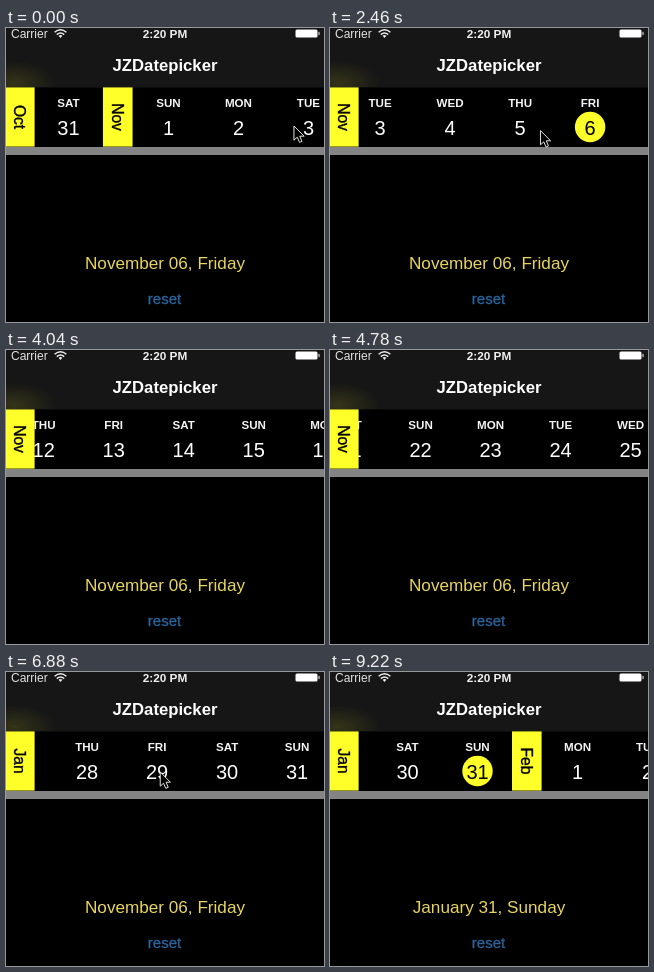
Animation, 318 px wide and 294 px high, one loop 9.24 s. Source, as an HTML page:

```html
<!DOCTYPE html>
<html lang="en">
<head>
<meta charset="utf-8">
<title>JZDatepicker</title>
<style>
  html, body { margin: 0; width: 100%; height: 100%; overflow: hidden; background: #000; }
  svg { display: block; width: 100%; height: 100%; }
  text { font-family: "Liberation Sans", Arial, sans-serif; text-anchor: middle; fill: #fff; }
  .bold { font-weight: bold; }
  .weekday { font-size: 11.6px; font-weight: bold; fill: #f4f4f4; }
  .day { font-size: 20px; }
  .month { font-size: 15.6px; fill: #000; stroke: #000; stroke-width: .35; }
  .picked .day { fill: #000; }
  .dot { fill: #ffff2a; visibility: hidden; }
  .picked .dot { visibility: visible; }
</style>
</head>
<body>
<svg viewBox="0 0 318 294">
  <defs>
    <radialGradient id="glow">
      <stop offset="0" stop-color="#ffff2a" stop-opacity=".13"/>
      <stop offset="1" stop-color="#ffff2a" stop-opacity="0"/>
    </radialGradient>
    <clipPath id="navClip"><rect width="318" height="59"/></clipPath>
    <clipPath id="stripClip"><rect y="59" width="318" height="60"/></clipPath>
  </defs>
  <rect width="318" height="294"/>

  <rect width="318" height="59.5" fill="#161616"/>
  <ellipse cx="8" cy="55" rx="42" ry="22" fill="url(#glow)" clip-path="url(#navClip)"/>
  <text x="5" y="9.6" font-size="12" style="text-anchor:start;fill:#e2e2e2">Carrier</text>
  <g fill="none" stroke="#eee" stroke-width="1.5">
    <path d="M48.6 4.3Q54.5-.9 60.4 4.3M50.8 6.6Q54.5 3.4 58.2 6.6"/>
    <path d="M52.6 7.8Q54.5 6.4 56.4 7.8L54.5 10Z" fill="#eee" stroke="none"/>
  </g>
  <text class="bold" x="159" y="9.6" font-size="11.8" style="fill:#f0f0f0">2:20 PM</text>
  <rect x="289.5" y="1.4" width="22" height="8.2" rx="1.5" fill="#fff"/>
  <rect x="312.3" y="3.8" width="1.5" height="3.4" rx=".7" fill="#aaa"/>
  <text class="bold" x="159" y="43" font-size="16.7">JZDatepicker</text>

  <g clip-path="url(#stripClip)">
    <g id="days"></g>
    <g id="months"></g>
  </g>
  <rect y="119" width="318" height="8" fill="#848484"/>

  <text id="label" x="159" y="241" font-size="17.15" style="fill:#e8d560"></text>
  <text x="158.5" y="276" font-size="15" style="fill:#2b659f;stroke:#2b659f;stroke-width:.3">reset</text>
  <path id="cursor" d="M0 0V14.2L3.3 11.2L5.6 16.4L8 15.3L5.8 10.2H10.2Z"
        fill="#000" stroke="#e4e4dc" stroke-linejoin="round"/>
</svg>
<script>
const LOOP = 9240, TAP = 7960, CELL = 70, HEAD = 30;
const $ = id => document.getElementById(id);

// time, scroll offset (0 puts the November header at the left edge)
const scrollPath = [
  [0, -97], [1580, -31], [2100, 50], [2600, 200], [3260, 403], [3800, 640],
  [4780, 1444], [5740, 2530], [6300, 4400], [6880, 6204], [7500, 6348]
];
// time, x, y for each stretch in which the pointer is on stage
const pointerPaths = [
  [[0, 288, 98], [1580, 207.5, 104], [2100, 118, 104], [2600, 232, 102],
   [3260, 152.5, 100], [3740, -14, 104]],
  [[5860, 320, 108], [6150, 130, 106], [6450, 262, 104], [6880, 154.5, 100],
   [7300, 24, 102], [7820, 146, 100], [8120, 146, 100], [8420, -14, 104]]
];

// Monotone cubic interpolation through column k of the points
function sample(pts, t, k = 1) {
  const last = pts.length - 1;
  if (t <= pts[0][0]) return pts[0][k];
  if (t >= pts[last][0]) return pts[last][k];
  const slope = i => (pts[i + 1][k] - pts[i][k]) / (pts[i + 1][0] - pts[i][0]);
  const tangent = i => {
    if (i === 0) return slope(0);
    if (i === last) return 0;
    const a = slope(i - 1), b = slope(i);
    return a * b > 0 ? 2 * a * b / (a + b) : 0;
  };
  let i = 0;
  while (t > pts[i + 1][0]) i++;
  const h = pts[i + 1][0] - pts[i][0], u = (t - pts[i][0]) / h, v = 1 - u;
  return v * v * (1 + 2 * u) * pts[i][k] + u * u * (3 - 2 * u) * pts[i + 1][k]
    + h * u * v * (v * tangent(i) - u * tangent(i + 1));
}

function add(parent, tag, attrs, text = '') {
  const el = document.createElementNS('http://www.w3.org/2000/svg', tag);
  for (const name in attrs) el.setAttribute(name, attrs[name]);
  el.textContent = text;
  return parent.appendChild(el);
}

const weekdays = ['SUN', 'MON', 'TUE', 'WED', 'THU', 'FRI', 'SAT'];
const sections = [], cells = {};
let left = -(HEAD + 31 * CELL);

['Oct', 'Nov', 'Dec', 'Jan', 'Feb'].forEach((name, n) => {
  const month = 9 + n;
  const count = new Date(Date.UTC(2015, month + 1, 0)).getUTCDate();
  for (let d = 1; d <= count; d++) {
    const date = new Date(Date.UTC(2015, month, d));
    const x = left + HEAD + CELL * (d - .5) + .5;
    const cell = add($('days'), 'g', { transform: `translate(${x} 0)` });
    add(cell, 'circle', { class: 'dot', cy: 99, r: 15.2 });
    add(cell, 'text', { class: 'weekday', y: 78.6 }, weekdays[date.getUTCDay()]);
    add(cell, 'text', { class: 'day', y: 106.7 }, d);
    cells[name + d] = cell;
  }
  const header = add($('months'), 'g', {});
  add(header, 'rect', { y: 59.4, width: HEAD - .4, height: 59.2, fill: '#ffff2a' });
  add(header, 'text', { class: 'month', transform: 'translate(8.6 89) rotate(90)' }, name);
  sections.push({ left, header });
  left += HEAD + count * CELL;
});

function draw(now) {
  const t = now % LOOP;
  const offset = sample(scrollPath, t);
  $('days').setAttribute('transform', `translate(${-offset} 0)`);

  // Headers stick to the left edge until the next one pushes them out
  sections.forEach(({ left, header }, i) => {
    const next = i + 1 < sections.length ? sections[i + 1].left : Infinity;
    const x = Math.min(Math.max(left - offset, -1), next - offset - HEAD);
    header.setAttribute('transform', `translate(${x} 0)`);
  });

  const tapped = t >= TAP;
  cells.Nov6.classList.toggle('picked', !tapped);
  cells.Jan31.classList.toggle('picked', tapped);
  $('label').textContent = tapped ? 'January 31, Sunday' : 'November 06, Friday';

  const path = pointerPaths.find(p => t >= p[0][0] && t <= p[p.length - 1][0]);
  $('cursor').style.visibility = path ? 'visible' : 'hidden';
  if (path) {
    $('cursor').setAttribute('transform', `translate(${sample(path, t)} ${sample(path, t, 2)})`);
  }
}

const start = performance.now();
function tick() {
  draw(performance.now() - start);
  requestAnimationFrame(tick);
}
tick();
</script>
</body>
</html>
```
